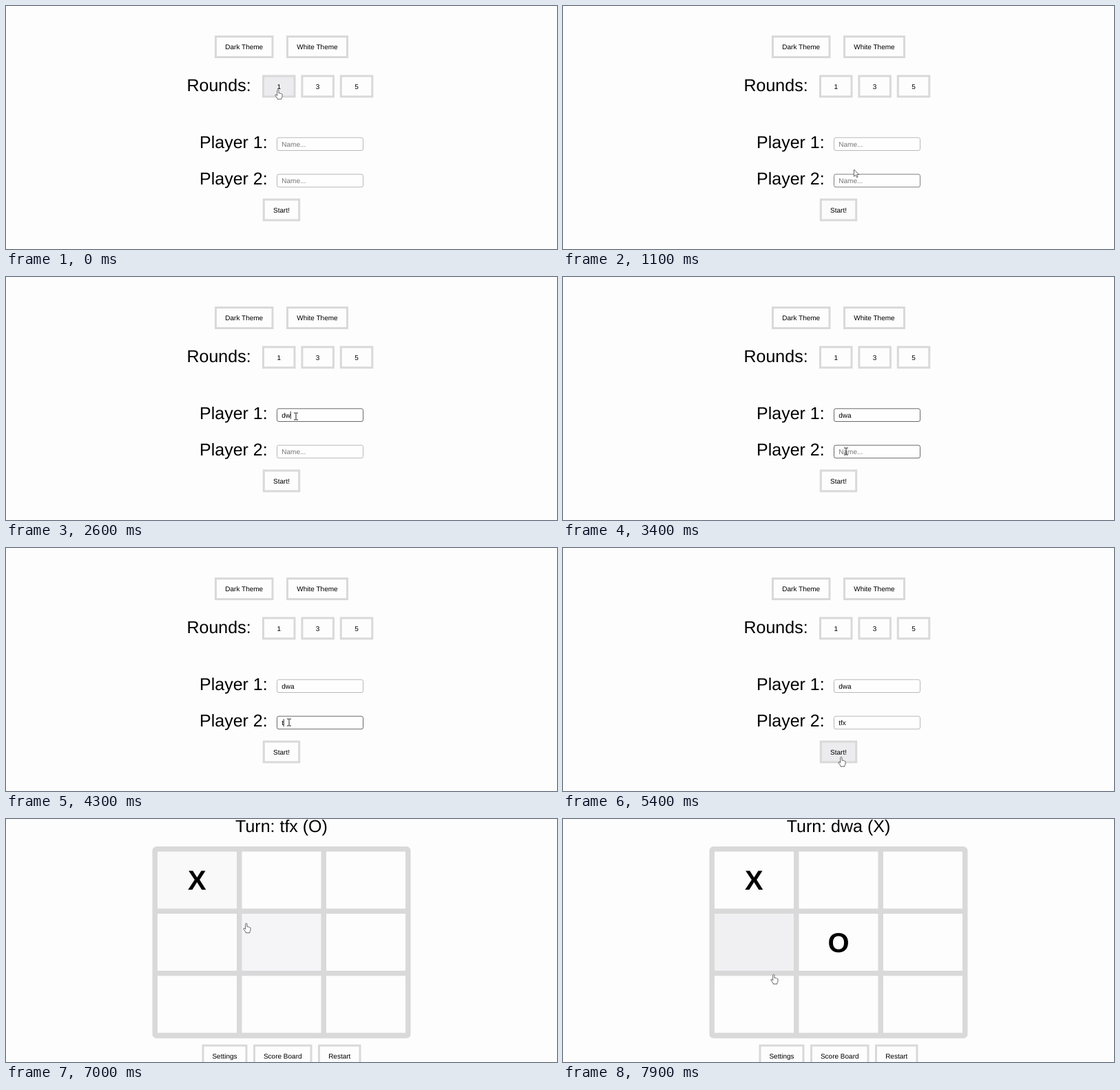
Animation of 800x354 px, one loop 8000 ms. Source, as an HTML page:

```html
<!DOCTYPE html>
<html lang="en">
<head>
<meta charset="utf-8">
<title>Tic-tac-toe</title>
<style>
  html, body { margin: 0; width: 100%; height: 100%; overflow: hidden; background: #fdfdfd; }
  svg { display: block; width: 800px; height: 354px; font-family: Arial, "Liberation Sans", sans-serif; }
  text { text-rendering: geometricPrecision; }
</style>
</head>
<body>
<svg id="stage" viewBox="0 0 800 354"></svg>
<script>
const LOOP = 8000, STEP = 100, KEY_GAP = 300;
const PAPER = [253, 253, 253], HOVER = [236, 235, 238];
const EDGE = [184, 184, 184], FOCUS = [104, 104, 104];
const GREY = '#d9d9d9';
const NAMES = ['dwa', 'tfx'];
const START = 5800, MARK_X = 6700, MARK_O = 7400;
const SMALL = 10, LARGE = 25;

const stage = document.getElementById('stage');

function add(tag, attrs, parent = stage) {
  const el = document.createElementNS('http://www.w3.org/2000/svg', tag);
  for (const k in attrs) el.setAttribute(k, attrs[k]);
  parent.appendChild(el);
  return el;
}

function label(parent, x, y, size, str, extra = {}) {
  const el = add('text', { x, y, 'font-size': size, ...extra }, parent);
  el.textContent = str;
  return el;
}

const middle = { 'text-anchor': 'middle' };
const setup = add('g', {});
const game = add('g', {});
const hot = []; // areas that react to the pointer

function watch(scene, kind, fade, el, x, y, w, h) {
  const area = { scene, kind, fade, el, x, y, w, h };
  hot.push(area);
  return area;
}

function button(scene, x, y, w, str) {
  const h = 33;
  const el = add('rect', {
    x: x + 1.5, y: y + 1.5, width: w - 3, height: h - 3,
    stroke: GREY, 'stroke-width': 3
  }, scene);
  label(scene, x + w / 2, y + 20, SMALL, str, middle);
  watch(scene, 'button', 200, el, x, y, w, h);
}

function field(y, name, downAt, upAt, firstKey) {
  const el = add('rect', {
    x: 393.5, y: y + 0.5, width: 125, height: 18.7, rx: 2.5, fill: '#fefefe'
  }, setup);
  const text = label(setup, 400.3, y + 13.5, SMALL, '');
  const caret = add('rect', { y: y + 4.5, width: 1, height: 11 }, setup);
  const area = watch(setup, 'field', 100, el, 393, y, 126, 20);
  return Object.assign(area, { text, caret, name, downAt, upAt, firstKey });
}

// settings screen
button(setup, 303, 43, 85.5, 'Dark Theme');
button(setup, 407, 43, 90, 'White Theme');
['1', '3', '5'].forEach((n, i) => button(setup, 372 + i * 56.4, 100.5, 48.5, n));
button(setup, 372.8, 280.5, 54.4, 'Start!');
label(setup, 262.5, 124, LARGE, 'Rounds:');
label(setup, 281, 207, LARGE, 'Player 1:');
label(setup, 281, 260, LARGE, 'Player 2:');
const fields = [
  field(191.3, NAMES[0], 1700, 3500, 2200),
  field(244.6, NAMES[1], 3500, 5300, 4200)
];

// game screen
const turn = label(game, 400, 19, LARGE, '', middle);
add('rect', { x: 212.5, y: 40, width: 375, height: 279.5, rx: 6, fill: GREY }, game);
for (let i = 0; i < 9; i++) {
  const x = 220 + (i % 3) * 122.5, y = 47.5 + Math.floor(i / 3) * 90.5;
  const el = add('rect', { x, y, width: 115, height: 83 }, game);
  watch(game, 'cell', 200, el, x, y, 115, 83);
}
const bold = { ...middle, 'font-weight': 'bold' };
const markX = label(game, 277.3, 102.5, 40, 'X', bold);
const markO = label(game, 400, 193.5, 40, 'O', bold);
button(game, 284.5, 328.5, 66, 'Settings');
button(game, 359, 328.5, 85.5, 'Score Board');
button(game, 453, 328.5, 62.5, 'Restart');

// pointers, hotspot at 0,0
const outline = { fill: '#fff', stroke: '#555', 'stroke-width': 0.9, 'stroke-linejoin': 'round' };
const pointers = {
  arrow: add('path', { d: 'M0 0V10L2.3 8L4 11.5L5.6 10.8L4 7.3H7.2Z', ...outline }),
  hand: add('path', {
    d: 'M-1.3 8.6V1.2Q-1.2 0 -.2 0Q.9 0 1 1.2V5Q2.2 4.2 2.9 5.4Q4 4.7 4.6 5.9Q6 5.5 6 7.2V9.5' +
       'Q6 11.4 4.9 12.3V13.8H-.9V12.6L-4.1 8.5Q-4.3 7 -2.9 7.1Z', ...outline
  }),
  beam: add('path', {
    d: 'M-3 -5H-.8L0 -4.4L.8 -5H3M0 -4.4V4.4M-3 5H-.8L0 4.4L.8 5H3',
    fill: 'none', stroke: '#222', 'stroke-width': 1
  })
};

// pointer moves: from, to, x, y
const home = [395, 122];
const moves = [
  [50, 700, 404, 304],
  [900, 1060, 423, 250],
  [1060, 1500, 421, 203],
  [3000, 3400, 411, 254],
  [4800, 5200, 404, 304.5],
  [5800, 6600, 279, 85],
  [6780, 7000, 349, 152],
  [7000, 7400, 391, 168],
  [7540, 7740, 318, 200],
  [7820, 7900, 306, 226.5]
];

const easeOut = k => 1 - (1 - k) ** 3;

function pointerAt(t) {
  let [x, y] = home;
  for (const [from, to, tx, ty] of moves) {
    if (t <= from) break;
    const k = easeOut(Math.min(1, (t - from) / (to - from)));
    x += (tx - x) * k;
    y += (ty - y) * k;
  }
  return [x, y];
}

const sceneAt = t => t < START ? setup : game;

function inside(a, t) {
  const [x, y] = pointerAt(t);
  return a.scene === sceneAt(t) && x >= a.x && x <= a.x + a.w && y >= a.y && y <= a.y + a.h;
}

// share of the fade time just past that was spent over the area
function glow(a, t) {
  let n = 0;
  for (let d = 0; d < a.fade; d += 10) n += inside(a, t - d);
  return n / (a.fade / 10);
}

const mix = (a, b, k) => `rgb(${a.map((v, i) => Math.round(v + (b[i] - v) * k))})`;
const show = (el, on) => { el.style.display = on ? '' : 'none'; };

function drawField(f, t) {
  const count = Math.max(0, Math.min(f.name.length, Math.floor((t - f.firstKey) / KEY_GAP) + 1));
  const focused = t >= f.downAt && t < f.upAt;
  f.text.textContent = f.name.slice(0, count) || 'Name...';
  f.text.setAttribute('fill', count ? '#000' : '#757575');
  f.el.setAttribute('stroke', mix(EDGE, FOCUS, focused ? 1 : glow(f, t)));

  const last = count ? f.firstKey + (count - 1) * KEY_GAP : f.downAt;
  f.caret.setAttribute('x', 400 + (count ? f.text.getComputedTextLength() : 0));
  f.caret.setAttribute('opacity', focused && (t - last) % 1000 < 500 ? 0.8 : 0);
}

function draw(t) {
  const scene = sceneAt(t);
  show(setup, scene === setup);
  show(game, scene === game);

  for (const a of hot) {
    if (a.scene === scene && a.kind !== 'field') a.el.setAttribute('fill', mix(PAPER, HOVER, glow(a, t)));
  }
  if (scene === setup) fields.forEach(f => drawField(f, t));

  const second = t >= MARK_X && t < MARK_O;
  turn.textContent = second ? `Turn: ${NAMES[1]} (O)` : `Turn: ${NAMES[0]} (X)`;
  show(markX, t >= MARK_X);
  show(markO, t >= MARK_O);

  const over = hot.find(a => inside(a, t));
  const kind = scene === game ? 'hand' : !over ? 'arrow' : over.kind === 'field' ? 'beam' : 'hand';
  for (const k in pointers) show(pointers[k], k === kind);
  pointers[kind].setAttribute('transform', `translate(${pointerAt(t)})`);
}

const begin = performance.now();
function tick() {
  const t = (performance.now() - begin) % LOOP;
  draw(Math.floor(t / STEP) * STEP);
  requestAnimationFrame(tick);
}
tick();
</script>
</body>
</html>
```
